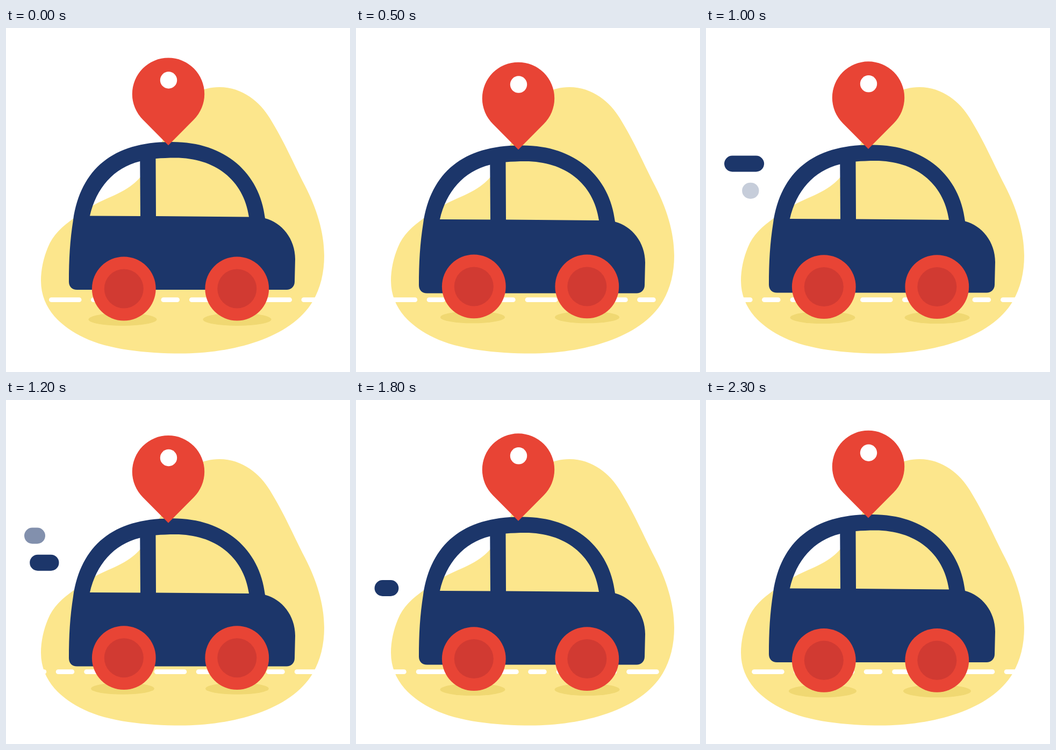
An HTML page with a canvas that plays this animation: 640x640 px, repeating every 2.4 s.

```html
<!DOCTYPE html>
<html lang="en">
<head>
<meta charset="utf-8">
<title>Car on the road</title>
<style>
html, body { margin: 0; width: 100%; height: 100%; overflow: hidden; background: #fff; }
canvas { display: block; width: 640px; height: 640px; }
</style>
</head>
<body>
<canvas id="stage" width="640" height="640"></canvas>
<script>
const ctx = document.getElementById('stage').getContext('2d');
const LOOP = 2400, STEP = 100;
const RED = '#e84435', DARK_RED = '#d13a32', NAVY = '#1c366a';
const YELLOW = '#fce68c', SHADOW = '#f0d872', WHITE = '#fff';

const blob = new Path2D(`M397 110 C440 110 473 138 491 168 C518 212 533 248 556 293
  C577 334 592 378 592 424 C592 455 585 484 571 508 C530 578 420 605.5 325 605.5
  C260 605.5 190 598 145 576 C105 557 65 524 65 470 C65 449 70 427 78 408
  C87 385 105 369 126 354 C140 343 152 336 165 328.5 C180 320 201 312 213 305.5
  C230 297 242 287 252 275 C272 250 278 232 290 212 C312 170 330 110 397 110 Z`);

const body = new Path2D(`M117 472 C117 430 119 395 125 357 C139 262 200 212 305 212
  C405 210 472 268 482 354 C513 362 538 392 538 430 L537 472 C537 481 530 487 522 487
  L132 487 C123 487 117 481 117 472 Z
  M156 349.5 L250 350 L249.3 248 C200 260 168 298 156 349.5 Z
  M279 350 L452 351.5 C442 282 388 241.5 315 241.5 C302 241.5 290 242 278.5 243 Z`);

const pin = new Path2D('M302 218.3 L254.6 170.4 A67.2 67.2 0 1 1 349.4 170.4 Z');

const clamp = v => Math.max(0, Math.min(1, v));
const ease = (t, from, to) => (1 - Math.cos(Math.PI * clamp((t - from) / (to - from)))) / 2;

function ellipse(x, y, rx, ry, color) {
  ctx.fillStyle = color;
  ctx.beginPath();
  ctx.ellipse(x, y, rx, ry, 0, 0, Math.PI * 2);
  ctx.fill();
}

function bar(x1, x2, y, width, color) {
  const r = width / 2;
  ctx.lineWidth = width;
  ctx.lineCap = 'round';
  ctx.strokeStyle = color;
  ctx.beginPath();
  ctx.moveTo(x1 + r, y);
  ctx.lineTo(Math.max(x1 + r + 0.01, x2 - r), y);
  ctx.stroke();
}

function road(t) {
  const period = 130.5, u = t / LOOP;
  const shift = period * u - 0.9 * Math.sin(2 * Math.PI * u);
  for (let x = 80 - period - shift; x < 640; x += period) {
    bar(x, x + 60.5, 505.7, 8.8, WHITE);
    bar(x + 78, x + 112.5, 505.7, 8.8, WHITE);
  }
}

// A streak grows to the left, then its tail catches up and it fades.
function streak(t, left, right, y) {
  const alpha = Math.min(clamp(t / 200), clamp((760 - t) / 200));
  if (alpha <= 0) return;
  const span = right - left - 30;
  const head = right - 30 - span * ease(t, 0, 390);
  const tail = right - span * ease(t, 370, 760);
  ctx.globalAlpha = alpha;
  bar(head, tail, y, 30, NAVY);
  ctx.globalAlpha = 1;
}

function draw(t) {
  const beat = t % 800;
  const bounce = beat < 345 ? ease(beat, 0, 345) : 1 - ease(beat, 345, 800);
  const lift = -5.5 * bounce;

  ctx.fillStyle = WHITE;
  ctx.fillRect(0, 0, 640, 640);
  ctx.fillStyle = YELLOW;
  ctx.fill(blob);
  road(t);

  for (const x of [217, 430]) {
    ellipse(x, 542.2 + lift, 63.5 - 4.8 * bounce, 11.8 - 0.9 * bounce, SHADOW);
  }

  ctx.save();
  ctx.translate(0, 8.7 * bounce);
  ctx.fillStyle = NAVY;
  ctx.fill(body, 'evenodd');
  ctx.restore();

  for (const x of [219.3, 429.8]) {
    ellipse(x, 485 + lift, 59.4, 59.4, RED);
    ellipse(x, 485 + lift, 36.5, 36.5, DARK_RED);
  }

  streak(t - 550, 34, 113, 252.5);
  streak(t - 950, 34.5, 98.5, 302.7);
  streak(t - 1350, 34.5, 81, 350);

  const pulse = t < 800 ? ease(t, 560, 800) : 1 - ease(t, 800, 1000);
  const scale = 1 + 0.1 * pulse;
  ctx.save();
  ctx.translate(302, 137.3 + 10.9 * bounce);
  ctx.scale(scale, scale);
  ctx.translate(-302, -137.3);
  ctx.fillStyle = RED;
  ctx.fill(pin);
  ellipse(302.5, 97, 15.7, 15.7, WHITE);
  ctx.restore();
}

const start = performance.now();
function tick() {
  const t = (performance.now() - start) % LOOP;
  draw(Math.floor(t / STEP) * STEP);
  requestAnimationFrame(tick);
}
tick();
</script>
</body>
</html>
```
